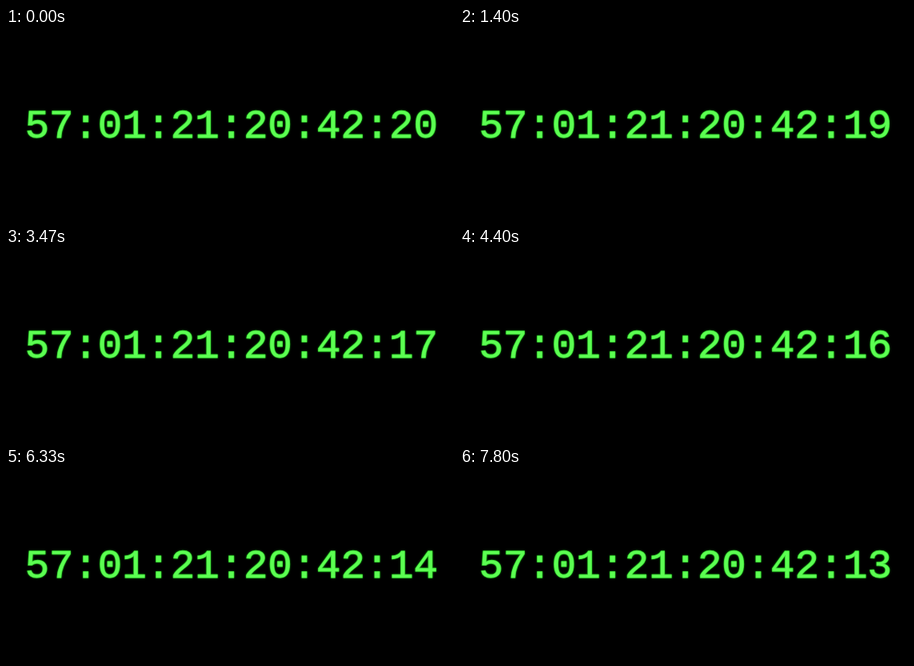
Animation of 560x240 px, one loop 8.07 s. Source, as an HTML page:

```html
<!DOCTYPE html>
<html lang="en">
<meta charset="utf-8">
<title>Countdown</title>
<style>
  html, body { margin: 0; width: 100%; height: 100%; overflow: hidden; background: #000; }
  svg { display: block; }
  text {
    font: 50.6px "Liberation Mono", monospace;
    fill: #5cff52;
    stroke: #35d02f;
    stroke-width: 1.3px;
    stroke-linejoin: round;
    paint-order: stroke;
    filter: blur(.75px) drop-shadow(0 0 1px #0a7a0a);
  }
</style>
<svg width="560" height="240" viewBox="0 0 560 240">
  <text id="clock" x="23.7" y="137"></text>
</svg>
<script>
  const LOOP = 8070;
  const TICKS = [1000, 2000, 3000, 4070, 5000, 6070, 7000];
  const clock = document.getElementById('clock');

  function draw(now) {
    const time = now % LOOP;
    const seconds = 20 - TICKS.filter(tick => time >= tick).length;
    clock.textContent = `57:01:21:20:42:${seconds}`;
    requestAnimationFrame(draw);
  }
  draw(performance.now());
</script>
</html>
```
